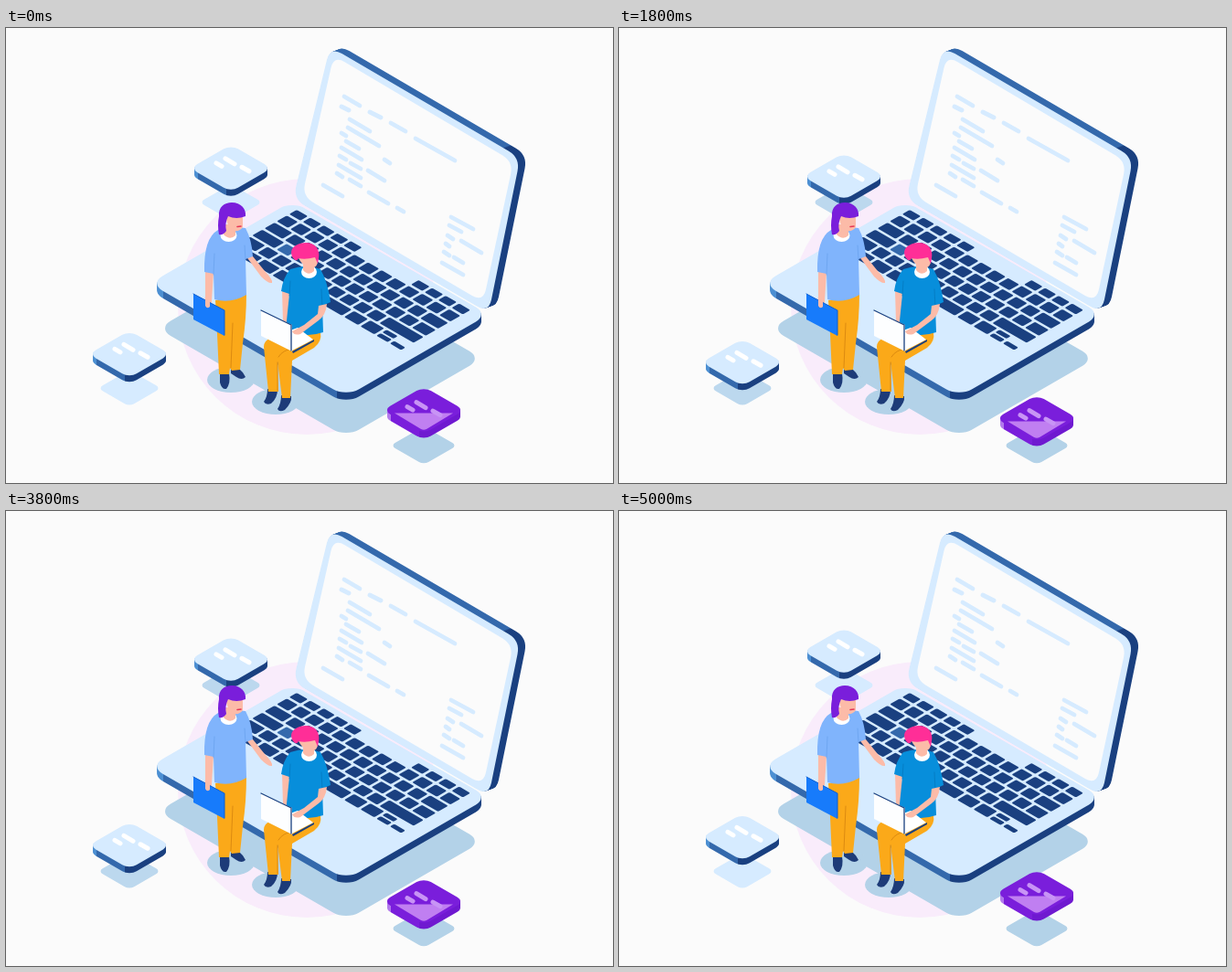
Animation, 664 px wide and 498 px high, one loop 5100 ms. Source, as an HTML page with a canvas:

```html
<!DOCTYPE html>
<html lang="en">
<head>
<meta charset="utf-8">
<title>Isometric workspace</title>
<style>
html, body { margin: 0; width: 100%; height: 100%; overflow: hidden; background: #fbfbfb; }
canvas { display: block; width: 100%; height: 100%; }
</style>
</head>
<body>
<canvas id="stage" width="664" height="498"></canvas>
<script>
const ctx = document.getElementById('stage').getContext('2d');
const PAPER = '#fbfbfb', ICE = '#d6ebff', SHADE = '#b3d2e8';
const SKY = '#4c8fd2', MID = '#3469ac', NAVY = '#1a4080';
const SKIN = '#fcbba8', ORANGE = '#fba919', PURPLE = '#7a1edb';
const LOOP = 5100, STEP = 200, COS = 0.866;

function fill(shape, color) {
  ctx.fillStyle = color;
  ctx.fill(typeof shape === 'string' ? new Path2D(shape) : shape);
}

function line(path, color, width) {
  ctx.strokeStyle = color;
  ctx.lineWidth = width;
  ctx.lineCap = ctx.lineJoin = 'round';
  ctx.stroke(new Path2D(path));
}

function ellipse(x, y, rx, ry, color) {
  const path = new Path2D();
  path.ellipse(x, y, rx, ry, 0, 0, 7);
  fill(path, color);
}

// Rounded rectangle on the isometric floor; (x, y) is its upper corner.
function isoRect(x, y, w, d, r, u = 0, v = 0) {
  const flat = new Path2D(), path = new Path2D();
  flat.roundRect(u, v, w, d, r);
  path.addPath(flat, new DOMMatrix([COS, 0.5, -COS, 0.5, x, y]));
  return path;
}

// The same, placed by its lower corner.
const isoFromFront = (x, y, w, d, r) =>
  isoRect(x - (w - d) * COS, y - (w + d) / 2, w, d, r);

// Side paint: a light left corner, then the front, then the right side.
function sidePaint(left, front, colors) {
  const [light, mid, dark] = colors;
  const g = ctx.createLinearGradient(left, 0, front, 0);
  const corner = 7 / (front - left);
  g.addColorStop(corner, light);
  g.addColorStop(corner, mid);
  g.addColorStop(1, mid);
  g.addColorStop(1, dark);
  return g;
}

function lidPaint() {
  const g = ctx.createLinearGradient(0, 131, 0, 132);
  g.addColorStop(0, MID);
  g.addColorStop(1, NAVY);
  return g;
}

function extrude(path, dx, dy, paint) {
  const steps = Math.ceil(Math.hypot(dx, dy));
  for (let i = steps; i > 0; i--) {
    ctx.save();
    ctx.translate(dx * i / steps, dy * i / steps);
    fill(path, paint);
    ctx.restore();
  }
}

function roundPoly(points, r) {
  const [first, last] = [points[0], points.at(-1)];
  let d = `M${(first[0] + last[0]) / 2} ${(first[1] + last[1]) / 2}`;
  points.forEach((p, i) => {
    const near = q => {
      const k = r / Math.hypot(q[0] - p[0], q[1] - p[1]);
      return `${p[0] + (q[0] - p[0]) * k} ${p[1] + (q[1] - p[1]) * k}`;
    };
    const prev = points.at(i - 1), next = points[(i + 1) % points.length];
    d += `L${near(prev)}Q${p[0]} ${p[1]} ${near(next)}`;
  });
  return new Path2D(d + 'Z');
}

function drawKeys() {
  const key = (u, v, w, h, color = NAVY) => fill(isoRect(318, 199, w - 3, h, 1.5, u, v), color);
  const unit = 17.1;
  for (let i = 0; i < 13; i++) if (i < 5 || i > 8) key(i * unit, 0, unit, 9.5);
  // First key, number of plain keys and last key, in key units.
  const rows = [[1, 11, 1], [1.5, 10, 1.5], [1.8, 10, 1.2], [1.3, 9, 2.7]];
  rows.forEach(([first, count, last], row) => {
    const v = 12.5 + row * 15.5;
    key(0, v, first * unit, 12.7);
    for (let i = 0; i < count; i++) {
      key((first + i) * unit, v, unit, 12.7, row === 2 && i === 0 ? MID : NAVY);
    }
    key((first + count) * unit, v, last * unit, 12.7);
  });
  let u = 0;
  for (const w of [1, 1, 1.3, 1.3, 4, 1.2, 1.2]) {
    key(u * unit, 74.5, w * unit, 12.7);
    u += w;
  }
  for (const v of [74.5, 82]) key(11 * unit, v, unit, 5.5);
  key(12 * unit, 82, unit, 5.5);
}

function drawScreen() {
  const front = roundPoly([[354.5, 20.5], [562.5, 142], [528, 312], [314, 187]], 15);
  extrude(front, 8, -3, lidPaint());
  fill(front, ICE);
  fill(roundPoly([[358.5, 30], [555, 146.5], [522, 300], [324, 184]], 14), PAPER);
  line('M370 75l17 10M398 92l12 6M421 104l16 9M448 121l43 24M367 86l8 4' +
    'M376 100l22 13M374 109l34 20M367 115l5 3M372 124l14 8M367 131l22 13M414 144l6 4' +
    'M365 140l7 4M377 148l11 6M364 150l24 14M396 156l18 11M362 159l6 4M376 166l12 7' +
    'M397 180l21 12M347 172l21 12M428 197l7 4M487 207l24 13M485 216l13 7M483 227l6 4' +
    'M498 233l22 13M481 236l4 3M479 245l6 4M490 251l10 6M477 257l23 13', ICE, 4.8);
}

function drawLaptop() {
  fill(isoFromFront(372, 447.7, 238, 172, 16), SHADE);
  const base = isoFromFront(372, 403.4, 248, 180, 16);
  extrude(base, 0, 8, sidePaint(165, 362, [SKY, MID, NAVY]));
  fill(base, ICE);
  drawScreen();
  drawKeys();
}

function drawWoman() {
  ellipse(246, 385, 26, 14, SHADE);
  fill('M234 379L244 378Q246 389 241 395Q236 396 234 388ZM246 372L255 373Q260 377 262 382Q258 386 252 382L246 378Z', '#1d3b78');
  fill('M229 298L263 290Q263 318 259 345L256 374L247 375L245 372L244 379L233 379L231 335Z', ORANGE);
  line('M248 323L246 372', '#dc8a10', 1);
  fill('M218 266L227 268L225 299Q225 307 220 307Q216 303 218 294Z', SKIN);
  fill('M262 249L270 250L283 266Q292 275 291 279Q287 280 279 272Z', SKIN);
  fill('M232 221Q246 216 262 219Q269 232 270 250L262 253L263 292Q246 302 228 297L227 269L217 267Q216 230 232 221Z', '#80b4fc');
  line('M228 247L227 270M261 238L262 254', '#6aa2ee', 0.8);
  ellipse(243.5, 227, 9, 7, '#fff');
  fill('M239 215H251V227Q245 233 238 226Z', SKIN);
  fill('M240 203H259L259 218Q256 223 249 222Q241 218 240 203Z', SKIN);
  fill('M233 206C232 196 239 191 247 191C257 191 263 198 262 206Q252 210 243 206Q239 214 241 222Q238 227 233 226Q231 216 233 206Z', PURPLE);
  line('M253 217.5L257 217', '#e73657', 1.6);
  fill('M205 291L239 309V337L205 319Z', '#177bfb');
  line('M205 291L239 309V336', '#0d5ed0', 1);
  fill('M218 288L223 289L223 305Q220 308 218 304Z', SKIN);
}

function drawMan() {
  ellipse(295, 409, 26, 14, SHADE);
  fill('M286 395L297 396Q297 405 290 411Q284 413 282 409Q286 404 286 395ZM301 402L312 403Q313 410 305 418Q299 421 297 417Q301 411 301 402Z', '#1d3b78');
  fill('M306 329L344 333Q346 343 337 350L313 364L311 405H302L297 365L298 398H287L282 349Q282 342 290 339Z', ORANGE);
  line('M297 366L297 397M298 360Q303 352 314 351', '#dc8a10', 1);
  fill('M302 287L310 289L309 323L303 322Z', SKIN);
  fill('M311 264Q329 258 344 264Q352 278 355 300L346 304L347 333Q327 340 306 330L310 291L301 288Q303 273 311 264Z', '#078edb');
  line('M311 277L310 293M345 286L346 306', '#0579bf', 0.8);
  ellipse(331.5, 267, 8.5, 7, '#fff');
  fill('M325 255H337V266Q331 272 325 265Z', SKIN);
  fill('M319 245H341V257Q339 263 333 263Q324 261 319 250Z', SKIN);
  fill('M312 246C312 239 320 235 328 235C338 235 344 242 342 252L341 258L338 251Q327 254 320 252Q318 256 315 253Q312 250 312 246Z', '#ff2e97');
  fill('M313 354L337 341V343L314 356Z', NAVY);
  fill('M313 353L336 341L319 328L311 331Z', '#fff');
  fill('M342 304L351 302Q350 314 342 320L322 335Q315 337 313 332L326 325L341 313Z', SKIN);
  fill('M279 309L313 325V354L279 337Z', '#fdfeff');
  line('M279 309L312 325V353', NAVY, 1.3);
}

function mix(from, to, k) {
  return `rgb(${from.map((c, i) => Math.round(c + (to[i] - c) * k))})`;
}

function drawTile(x, y, drop, purple) {
  const size = 51.5;
  const [halfWidth, shadowY] = purple ? [33.5, 457] : [31.5, y + 61];
  const shadowSize = (halfWidth + 3) / COS;
  const shade = purple
    ? (drop > 10 ? '#9c90d8' : SHADE)
    : mix([214, 235, 255], [179, 210, 232], Math.min(1, drop / 12));
  fill(isoRect(x, shadowY - shadowSize / 2, shadowSize, shadowSize, 6), shade);

  ctx.save();
  ctx.translate(x, y + drop);
  const face = isoRect(0, -2, size, size, 9);
  const sides = purple ? ['#b27aec', PURPLE, '#6f19d0'] : [SKY, MID, NAVY];
  extrude(face, 0, 7, sidePaint(-43, -5, sides));
  fill(face, purple ? PURPLE : ICE);
  if (purple) {
    fill('M-32 27H32L3 44.5Q0 46 -3 44.5Z', '#c07ff1');
    ctx.translate(-2, 2);
  }
  line('M-16 18l6 3.5M-6 13l10 6M12 22.5l8 4.5', purple ? '#c894f5' : '#fff', 5);
  ctx.restore();
}

function draw(now) {
  const t = Math.floor(now % LOOP / STEP) * STEP;
  const drop = t < 3000 ? t / 200 : (5000 - t) * 15 / 2000;
  fill('M0 0H664V498H0Z', PAPER);
  ellipse(329, 305, 141, 140, '#f9ecfb');
  drawLaptop();
  drawTile(246, 129.8, drop);
  drawTile(135, 333.3, drop);
  drawTile(457, 394.6, drop, true);
  drawWoman();
  drawMan();
}

const start = performance.now();
function tick() {
  draw(performance.now() - start);
  requestAnimationFrame(tick);
}
tick();
</script>
</body>
</html>
```
